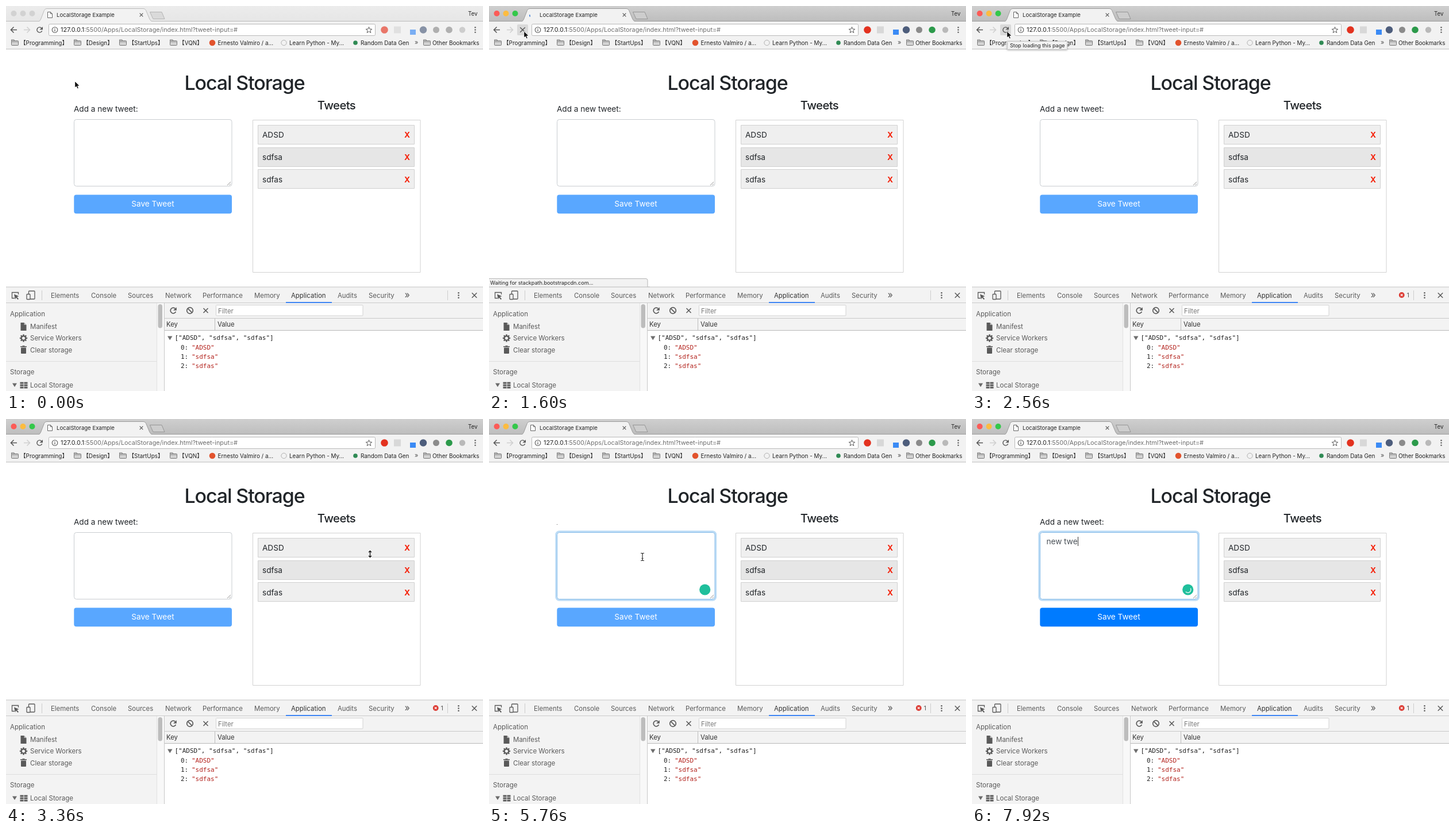
Animation, 830 px wide and 670 px high, one loop 8000 ms. Source, as an HTML page with a canvas:

```html
<!DOCTYPE html>
<html lang="en">
<head>
<meta charset="utf-8">
<title>LocalStorage Example</title>
<style>
html, body { margin: 0; width: 100%; height: 100%; overflow: hidden; background: #fff; }
canvas { display: block; }
</style>
</head>
<body>
<canvas id="stage" width="830" height="670"></canvas>
<script>
const ctx = document.getElementById('stage').getContext('2d');
const LOOP = 8000, STEP = 80;
const SANS = 'Inter, "Noto Sans CJK SC", "Noto Sans CJK JP", "Noto Sans CJK", sans-serif';
const MONO = '"DejaVu Sans Mono", monospace';

const AT = {
  active: 560, hover: 1200, load: 1440, status: 1520, tip: 1840, loaded: 2560,
  leave: 2640, resize: 2960, resizeEnd: 3440, focus: 5040, type: 6800
};
const KEY_GAP = 160, TYPED = 'new twe';

// time, x, y of the pointer
const PATH = [
  [0, 120, 131], [240, 120, 131], [1280, 61, 44], [2640, 61, 44], [3040, 604, 482],
  [3360, 633, 235], [4160, 314, 255], [4480, 314, 255], [5040, 267, 240], [8000, 267, 240]
];

// Inter runs wide, so sans sizes are given in Roboto terms and scaled once.
function sampleWidth(font) {
  ctx.font = `100px ${font}`;
  return ctx.measureText('Application Elements Local Storage').width;
}
const SANS_SCALE = sampleWidth('Roboto, sans-serif') / sampleWidth(SANS);

function text(s, x, cy, size, color = '#222', o = {}) {
  const px = o.font ? size : size * SANS_SCALE;
  ctx.font = `${o.weight || 400} ${px}px ${o.font || SANS}`;
  ctx.textAlign = o.align || 'left';
  ctx.letterSpacing = (o.track || 0) + 'px';
  ctx.fillStyle = color;
  ctx.fillText(s, x, cy + px * 0.362);
  ctx.letterSpacing = '0px';
}

function rect(x, y, w, h, fill) {
  ctx.fillStyle = fill;
  ctx.fillRect(x, y, w, h);
}

function box(x, y, w, h, r, fill, stroke, lw = 1) {
  ctx.beginPath();
  ctx.roundRect(x, y, w, h, r);
  if (fill) { ctx.fillStyle = fill; ctx.fill(); }
  if (stroke) { ctx.strokeStyle = stroke; ctx.lineWidth = lw; ctx.stroke(); }
}

function dot(x, y, r, fill) {
  ctx.beginPath();
  ctx.arc(x, y, r, 0, 7);
  ctx.fillStyle = fill;
  ctx.fill();
}

function arc(x, y, r, a, b, color, lw) {
  ctx.beginPath();
  ctx.arc(x, y, r, a, b);
  ctx.strokeStyle = color;
  ctx.lineWidth = lw;
  ctx.stroke();
}

function trace(pts, close) {
  ctx.beginPath();
  for (let i = 0; i < pts.length; i += 2) ctx.lineTo(pts[i], pts[i + 1]);
  if (close) ctx.closePath();
}

function line(pts, color, lw = 1) {
  trace(pts);
  ctx.strokeStyle = color;
  ctx.lineWidth = lw;
  ctx.stroke();
}

function poly(pts, fill, stroke) {
  trace(pts, true);
  ctx.fillStyle = fill;
  ctx.fill();
  if (stroke) { ctx.strokeStyle = stroke; ctx.lineWidth = 1; ctx.stroke(); }
}

function cross(x, y, r, color, lw) {
  line([x - r, y - r, x + r, y + r], color, lw);
  line([x + r, y - r, x - r, y + r], color, lw);
}

function reload(x, y, r, color, lw) {
  arc(x, y, r, 0.4, 5.5, color, lw);
  poly([x + r + 1, y - r - 1, x + r + 1, y - 0.3, x, y - 0.3], color);
}

function dots(x, y, color) {
  for (let i = -1; i < 2; i++) dot(x, y + i * 4.3, 1.3, color);
}

function folder(x) {
  box(x + 0.5, 60.5, 12, 8, 1, '#d3d3d3', '#777');
  line([x + 0.5, 61, x + 0.5, 58.8, x + 5, 58.8, x + 6.3, 60.5], '#777');
  line([x + 1, 62.5, x + 12, 62.5], '#999');
}

function tabStrip(t) {
  const on = t >= AT.active;
  const g = ctx.createLinearGradient(0, 0, 0, 27);
  g.addColorStop(0, on ? '#cfcfcf' : '#ececec');
  g.addColorStop(1, on ? '#bdbdbd' : '#e6e6e6');
  rect(0, 0, 830, 27, g);
  const lights = on ? ['#fc5b57', '#fdbc40', '#34c84a'] : ['#d2d2d2', '#d2d2d2', '#d2d2d2'];
  lights.forEach((c, i) => dot(13.5 + i * 16, 13, 5, c));

  const edge = on ? '#9c9c9c' : '#bcbcbc';
  line([0, 26.5, 830, 26.5], edge);
  ctx.beginPath();
  ctx.moveTo(55, 27.5);
  ctx.quadraticCurveTo(59, 27, 60.5, 23);
  ctx.lineTo(66.5, 7.5);
  ctx.quadraticCurveTo(68, 4.5, 71, 4.5);
  ctx.lineTo(239, 4.5);
  ctx.quadraticCurveTo(242, 4.5, 243.5, 7.5);
  ctx.lineTo(250, 23);
  ctx.quadraticCurveTo(252, 27, 256, 27.5);
  ctx.fillStyle = '#f2f2f2';
  ctx.fill();
  ctx.strokeStyle = edge;
  ctx.lineWidth = 1;
  ctx.stroke();

  poly([250.5, 10.5, 271, 10.5, 276, 22.5, 256, 22.5], on ? '#cdcdcd' : '#dadada', on ? '#969696' : '#b4b4b4');
  if (t >= AT.load && t < AT.loaded) {
    const k = (t - 1560) / 440;
    const len = 0.25 + 3.1 * Math.abs(Math.sin(k * Math.PI / 2));
    const mid = 2.97 - 0.1 * k + Math.max(0, k - 1) * 4;
    arc(76, 16, 5.2, mid - len / 2, mid + len / 2, '#4a86dc', 1.7);
  } else {
    poly([72.5, 10.5, 77.5, 10.5, 80.5, 13.5, 80.5, 20.5, 72.5, 20.5], '#fff', '#666');
    line([77.5, 10.5, 77.5, 13.5, 80.5, 13.5], '#666');
  }
  text('LocalStorage Example', 88, 15.5, 10.15);
  cross(235.5, 15.5, 2.8, '#555', 1.2);
  text('Tev', 804, 13, 10.3);
}

function toolbar(t) {
  const on = t >= AT.active;
  rect(0, 27, 830, 48, '#f2f2f2');
  rect(0, 74.5, 830, 1, '#bcbcbc');
  line([19, 41.5, 8.5, 41.5], '#555', 1.5);
  line([13.5, 36.5, 8.5, 41.5, 13.5, 46.5], '#555', 1.5);
  line([31, 41.5, 41, 41.5], '#cfcfcf', 1.5);
  line([36.5, 36.5, 41.5, 41.5, 36.5, 46.5], '#cfcfcf', 1.5);
  if (t >= AT.hover && t < AT.leave + STEP) box(49, 32, 19, 19, 2, '#d9d9d9');
  if (t >= AT.load && t < AT.loaded) cross(58.5, 41.5, 4.3, '#555', 1.4);
  else reload(58.5, 41.5, 4.5, '#5a5a5a', 1.5);

  box(74.5, 31.5, 568, 20, 2, '#fff', '#b9b9b9');
  arc(85, 41.5, 4.8, 0, 7, '#5a5a5a', 1.1);
  rect(84.4, 40.7, 1.2, 3.6, '#5a5a5a');
  rect(84.4, 38.5, 1.2, 1.3, '#5a5a5a');
  const host = '127.0.0.1';
  text(host, 95, 41.5, 11.5);
  text(':5500/Apps/LocalStorage/index.html?tweet-input=#', 95 + ctx.measureText(host).width, 41.5, 11.5, '#6e6e6e');
  const star = [];
  for (let i = 0; i < 10; i++) {
    const r = i % 2 ? 2.4 : 5.6, a = i * Math.PI / 5 - Math.PI / 2;
    star.push(631.5 + r * Math.cos(a), 42 + r * Math.sin(a));
  }
  poly(star, '#fff', '#5a5a5a');

  ctx.globalAlpha = on ? 1 : 0.65;
  dot(658.5, 41.5, 6.3, '#e3321f');
  rect(675, 35.5, 12, 12, '#d8d8d8');
  rect(703, 41, 10, 9, '#3b8bf5');
  dot(726, 41.5, 6.2, '#4d5d7c');
  dot(748.5, 41.5, 5.5, '#8b8b8b');
  dot(771, 41.5, 5.8, on ? '#2c9a4b' : '#8c8c8c');
  dot(794, 41.5, 5.2, '#b9b9b9');
  ctx.globalAlpha = 1;
  dots(816.5, 41.5, '#666');

  [9, 118, 197, 285, 726].forEach(folder);
  [['Programming', 66], ['Design', 160], ['StartUps', 243.5], ['VQN', 321.5]]
    .forEach(([s, x]) => text(`【${s}】`, x, 64, 10.5, '#222', { align: 'center' }));
  dot(359, 64, 5.3, '#e2532d');
  text('Ernesto Valmiro / a...', 368.5, 64, 10.5);
  arc(483.5, 64, 4.6, 0, 7, '#b0b0b0', 1);
  text('Learn Python - My...', 493, 64, 10.5);
  dot(608, 64, 3.8, '#2f8a54');
  text('Random Data Gen', 617, 64, 10.5);
  text('»', 711, 63, 11.5, '#555');
  text('Other Bookmarks', 742, 64, 10.5);
}

function page(t) {
  const focused = t >= AT.focus;
  const count = t < AT.type ? 0 : Math.min(TYPED.length, 1 + Math.floor((t - AT.type) / KEY_GAP));
  text('Local Storage', 415, 133.5, 36, '#212529', { weight: 500, align: 'center', track: -1.1 });
  text('Tweets', 575, 173, 21.5, '#212529', { weight: 500, align: 'center', track: -0.6 });
  if (focused && !count) rect(118, 183, 1, 1, '#555');
  else text('Add a new tweet:', 118, 179, 14.4, '#212529');

  if (focused) box(116.8, 195.8, 277.8, 119.4, 5.5, null, '#bcdcf6', 3);
  box(118.5, 197.5, 274.5, 116, 4, '#fff', focused ? '#86bbe8' : '#c9cdd1');
  line([385, 312, 391, 306], '#888', 0.9);
  line([388.5, 312, 391, 309.5], '#888', 0.9);

  if (focused) {
    const shown = TYPED.slice(0, count);
    text(shown, 129.5, 213, 14.4, '#495057');
    const end = 130 + ctx.measureText(shown).width;
    const since = count ? (t - AT.type) % KEY_GAP : t - AT.focus;
    if (since % 1000 < 500) rect(Math.round(end), 205, 1, 16, '#333');
    dot(375.7, 297, 9.6, '#1fbf9c');
    if (count) {
      const a = (t - 7920) / 130;
      arc(375.7, 297, 5.2, a - 0.5, a + 2.4, '#d5f5ec', 1.5);
    }
  }
  box(118.3, 328.4, 274.7, 32.8, 4, count ? '#007bff' : '#59a7ff');
  text('Save Tweet', 255.5, 344.5, 14.4, '#fff', { align: 'center' });

  box(429.5, 198.5, 291.5, 265, 0, '#fff', '#d2d2d2');
  ['ADSD', 'sdfsa', 'sdfas'].forEach((s, i) => {
    const y = 207.5 + i * 38.7;
    box(438.5, Math.floor(y) + 0.5, 272, 33, 0, i === 1 ? '#e6e6e6' : '#efefef', '#d0d0d0');
    text(s, 446, y + 17, 14.4, '#212529');
    text('X', 698, y + 17, 14.4, '#f5210a', { weight: 700, align: 'center' });
  });
}

function sideIcons() {
  const c = '#5a5a5a';
  poly([25.5, 551, 31.5, 551, 35.5, 555, 35.5, 565, 25.5, 565], c);
  poly([31.5, 551, 31.5, 555, 35.5, 555], '#bbb');
  for (let i = 0; i < 8; i++) {
    const a = i * Math.PI / 4, x = Math.cos(a), y = Math.sin(a);
    line([30.5 + x * 4, 578 + y * 4, 30.5 + x * 6.6, 578 + y * 6.6], c, 2.4);
  }
  arc(30.5, 578, 3.7, 0, 7, c, 2.3);
  box(26, 594.5, 9, 10.5, 1, c);
  rect(25, 592, 11, 1.6, c);
  rect(28.5, 591, 4, 1.5, c);
  poly([11, 656.5, 19, 656.5, 15, 663], '#6a6a6a');
  for (let i = 0; i < 3; i++) {
    rect(24.5, 654.5 + i * 4, 6, 3, c);
    rect(31.5, 654.5 + i * 4, 6, 3, c);
  }
}

function devtools(t) {
  const c = '#5a5a5a';
  rect(0, 489, 830, 181, '#f3f3f3');
  rect(0, 488.5, 830, 1, '#c4c4c4');
  rect(0, 516, 830, 1, '#cbcbcb');
  line([15, 508.5, 10.5, 508.5, 10.5, 498.5, 21.5, 498.5, 21.5, 502], c, 1.3);
  poly([14, 501.5, 22.5, 505, 19, 506.3, 22, 509.8, 20.5, 511, 17.6, 507.6, 16, 510.5], c);
  box(39.5, 496, 10.5, 14, 1, null, c, 1.3);
  box(36, 501.5, 6, 9, 1, '#f3f3f3', c, 1.3);
  rect(62, 495, 1, 17, '#ccc');
  [['Elements', 78], ['Console', 148], ['Sources', 212], ['Network', 277], ['Performance', 342],
    ['Memory', 432], ['Application', 496], ['Audits', 577], ['Security', 631]]
    .forEach(([s, x]) => text(s, x, 503.5, 12.1, x === 496 ? '#333' : c));
  text('»', 693.5, 502, 17, c);
  rect(487, 515, 80, 2, '#3f86f3');
  if (t >= AT.loaded) {
    dot(747.7, 503, 4.9, '#dc3a32');
    cross(747.7, 503, 1.9, '#fff', 1.2);
    text('1', 756.5, 503.5, 11.5, c);
  }
  rect(768, 495, 1, 17, '#ccc');
  dots(787.5, 503.5, c);
  cross(815, 503.5, 4.2, c, 1.5);

  text('Application', 7, 535.5, 12.2, c);
  text('Manifest', 42, 558, 12.2, c);
  text('Service Workers', 42, 578, 12.2, c);
  text('Clear storage', 42, 598.5, 12.2, c);
  rect(0, 618, 263, 1, '#dedede');
  text('Storage', 7, 637, 12.2, c);
  text('Local Storage', 42, 660, 12.2, c);
  sideIcons();
  rect(262, 517, 1, 153, '#e2e2e2');
  rect(263, 517, 12, 153, '#f8f8f8');
  box(264.5, 519, 7.5, 41.5, 3.7, '#bdbdbd');
  rect(275, 517, 1, 153, '#c8c8c8');

  reload(291, 530, 4.8, c, 1.7);
  arc(320, 530, 5.3, 0, 7, c, 1.7);
  line([316.3, 526.3, 323.7, 533.7], c, 1.7);
  cross(347.5, 530, 4, c, 1.6);
  box(365.5, 520.5, 255.5, 18.5, 1, '#fff', '#d2d2d2');
  text('Filter', 369, 530.5, 12, '#777');
  rect(276, 543, 554, 1, '#c8c8c8');
  text('Key', 279, 554, 12, '#333');
  text('Value', 368, 554, 12, '#333');
  rect(363, 544, 1, 20, '#bdbdbd');
  rect(276, 564, 554, 106, '#fff');
  rect(276, 564, 554, 1, '#b8b8b8');

  const mono = { font: MONO };
  poly([281, 574.5, 289.5, 574.5, 285.2, 581.5], '#6e6e6e');
  text('["ADSD", "sdfsa", "sdfas"]', 293.5, 577.5, 11, '#222', mono);
  ['ADSD', 'sdfsa', 'sdfas'].forEach((s, i) => {
    const y = 593.7 + i * 16.2;
    text(i + ':', 304, y, 11, '#222', mono);
    text(`"${s}"`, 323, y, 11, '#b3221c', mono);
  });
}

function overlays(t) {
  if (t >= AT.status && t < AT.loaded) {
    box(-3.5, 474.5, 279.5, 18, 3, '#f2f2f2', '#b4b4b4');
    rect(0, 489, 280, 5, '#f3f3f3');
    rect(0, 488.5, 280, 1, '#b9b9b9');
    text('Waiting for stackpath.bootstrapcdn.com...', 2, 482, 9.6);
  }
  if (t >= AT.tip && t < AT.leave) {
    ctx.shadowColor = 'rgba(0,0,0,.3)';
    ctx.shadowBlur = 3;
    ctx.shadowOffsetY = 1;
    box(61, 61, 105, 15, 0, '#f1f1f1');
    ctx.shadowColor = 'transparent';
    box(61.5, 61.5, 104, 14, 0, null, '#c6c6c6');
    text('Stop loading this page', 66, 68.5, 9.6);
  }
}

function pointerAt(t) {
  const i = PATH.findIndex(p => p[0] > t);
  const [t0, x0, y0] = PATH[i - 1], [t1, x1, y1] = PATH[i];
  const u = (t - t0) / (t1 - t0), e = u * u * (3 - 2 * u);
  return [x0 + (x1 - x0) * e, y0 + (y1 - y0) * e];
}

function pointer(t) {
  if (t >= AT.type) return;
  const [x, y] = pointerAt(t);
  ctx.save();
  ctx.translate(Math.round(x), Math.round(y));
  if (t >= AT.resize && t < AT.resizeEnd) {
    for (const [color, lw] of [['#fff', 3.5], ['#111', 1.4]]) {
      line([0.5, -5, 0.5, 5], color, lw);
      line([-2, -3, 0.5, -5.5, 3, -3], color, lw);
      line([-2, 3, 0.5, 5.5, 3, 3], color, lw);
    }
  } else if (x > 118 && x < 393 && y > 197 && y < 314) {
    line([0, -6, 0, 6], '#333', 1.2);
    line([-3, -6.5, -1, -6.5, 0, -5.5, 1, -6.5, 3, -6.5], '#333', 1.1);
    line([-3, 6.5, -1, 6.5, 0, 5.5, 1, 6.5, 3, 6.5], '#333', 1.1);
    line([-1.5, 2.5, 1.5, 2.5], '#333', 1);
  } else {
    poly([0, 0, 0, 11, 2.5, 8.8, 4.3, 12.9, 6.2, 12, 4.4, 8.1, 7.8, 8], '#111', '#fff');
    poly([0.3, 1, 0.3, 10.3, 2.7, 8.2, 4.5, 12.3, 5.6, 11.8, 3.8, 7.6, 7, 7.6], '#111');
  }
  ctx.restore();
}

function draw(t) {
  rect(0, 0, 830, 670, '#fff');
  tabStrip(t);
  toolbar(t);
  page(t);
  devtools(t);
  overlays(t);
  pointer(t);
}

const start = performance.now();
function tick() {
  const t = Math.max(0, performance.now() - start) % LOOP;
  draw(Math.floor(t / STEP) * STEP);
  requestAnimationFrame(tick);
}
tick();
</script>
</body>
</html>
```
